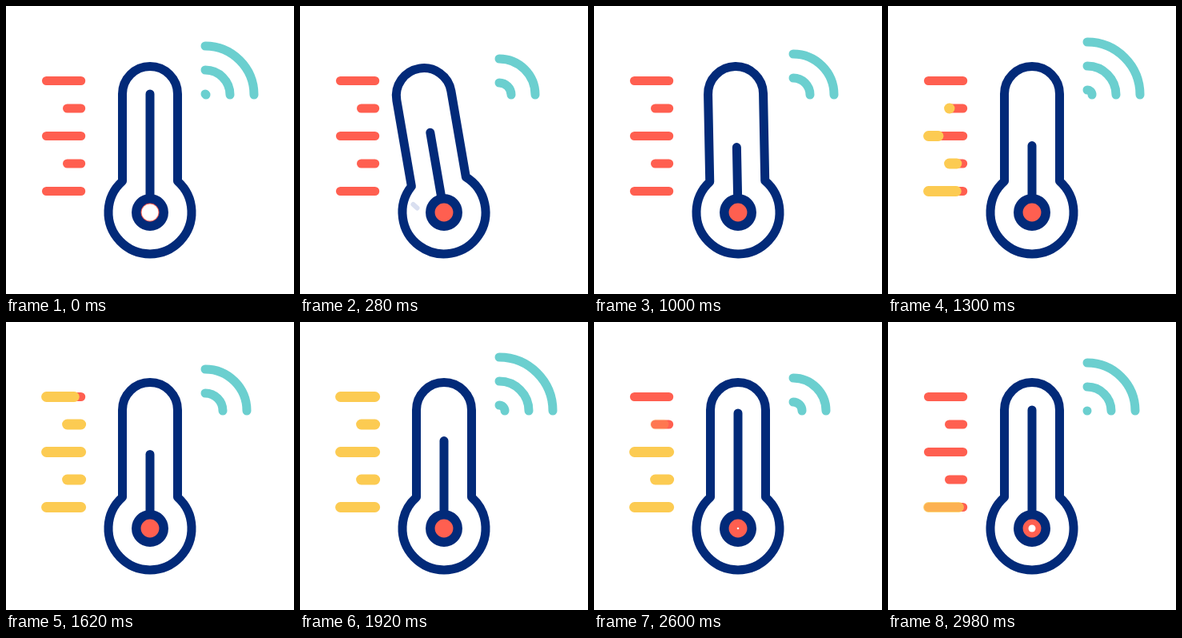
An HTML page for the animation above (3000 ms loop, 360 px wide and 360 px high).

```html
<!DOCTYPE html>
<html lang="en">
<head>
<meta charset="utf-8">
<title>Thermometer</title>
<style>
  html, body { margin: 0; width: 100%; height: 100%; overflow: hidden; background: #fff; }
  svg { display: block; width: 100vw; height: 100vh; fill: none; stroke-linecap: round; stroke-linejoin: round; }
</style>
</head>
<body>
<svg id="stage" viewBox="0 0 360 360"></svg>
<script>
const LOOP = 3000;
const NAVY = '#022a79', CORAL = '#ff5f50', TEAL = '#6bcfcf', YELLOW = '#fccb52';
const PIVOT = { x: 180, y: 258 };
const WAVE = { x: 249, y: 111, gap: 30, period: 600, reach: 67.5 };
const BAR_END = 93.7;

const stage = document.getElementById('stage');

function add(parent, tag, attrs) {
  const node = document.createElementNS('http://www.w3.org/2000/svg', tag);
  set(node, attrs);
  parent.appendChild(node);
  return node;
}

function set(node, attrs) {
  for (const name in attrs) node.setAttribute(name, attrs[name]);
}

const progress = (t, start, length) => Math.min(1, Math.max(0, (t - start) / length));
const smooth = u => u * u * (3 - 2 * u);
const steep = u => u * u / (u * u + (1 - u) * (1 - u));

// Scale marks, top to bottom, each with a yellow stroke over the coral one.
const bars = Array.from({ length: 5 }, (_, i) => {
  const x = i % 2 ? 76.5 : 50.5;
  const y = 93.5 + 34.5 * i;
  add(stage, 'path', { d: `M${x} ${y}H${BAR_END}`, stroke: CORAL, 'stroke-width': 11 });
  const cover = add(stage, 'path', { stroke: YELLOW, 'stroke-width': 12.8 });
  return { x, y, cover };
});

const waves = [0, 1, 2].map(() => add(stage, 'path', { stroke: TEAL, 'stroke-width': 11 }));

const glint = add(stage, 'path', { d: 'M141.5 248L146.5 252.5', stroke: '#d9dff0', 'stroke-width': 6 });
const body = add(stage, 'g', { stroke: NAVY, 'stroke-width': 11 });
add(body, 'path', { d: 'M145.5 219V110A34.5 34.5 0 0 1 214.5 110V219A52 52 0 1 1 145.5 219Z' });
const mercury = add(body, 'path', {});
add(stage, 'circle', { cx: PIVOT.x, cy: PIVOT.y, r: 17.2, fill: CORAL, stroke: NAVY, 'stroke-width': 11.5 });
const core = add(stage, 'circle', { cx: PIVOT.x, cy: PIVOT.y, fill: '#fff' });

function drawBars(t) {
  bars.forEach(({ x, y, cover }, i) => {
    const grow = progress(t, 1050 + 80 * (4 - i), 310);
    const leave = progress(t, 2402 + 140 * i, 150);
    const end = x + (BAR_END - x) * grow * (1 - leave);
    set(cover, {
      d: `M${x} ${y}H${end}`,
      opacity: grow > 0 ? Math.max(0, 1 - 2 * leave) : 0
    });
  });
}

function drawWaves(t) {
  const phase = (t / WAVE.period * WAVE.gap + 1) % WAVE.gap;
  waves.forEach((wave, i) => {
    const r = phase + WAVE.gap * i;
    set(wave, {
      d: `M${WAVE.x} ${WAVE.y - r}A${r} ${r} 0 0 1 ${WAVE.x + r} ${WAVE.y}`,
      opacity: r < WAVE.reach ? 1 : 0
    });
  });
}

function drawThermometer(t) {
  const tilt = -10 * (smooth(progress(t, 0, 190)) - smooth(progress(t, 190, 1025)));
  const fall = steep(progress(t, 0, 463)) - steep(progress(t, 1000, 2000));
  const length = 148 - 66.6 * fall;
  set(body, { transform: `rotate(${tilt} ${PIVOT.x} ${PIVOT.y})` });
  set(mercury, { d: `M${PIVOT.x} ${PIVOT.y - 20}V${PIVOT.y - length}` });
  set(glint, { opacity: t > 240 && t < 900 ? 1 : 0 });
  const r = t < 100 ? 10.5 * (1 - t / 100) : 4.5 * progress(t, 2150, 830) ** 2;
  set(core, { r });
}

function render(t) {
  drawBars(t);
  drawWaves(t);
  drawThermometer(t);
}

let start;
function tick(now) {
  start ??= now;
  render((now - start) % LOOP);
  requestAnimationFrame(tick);
}
render(0);
requestAnimationFrame(tick);
</script>
</body>
</html>
```
